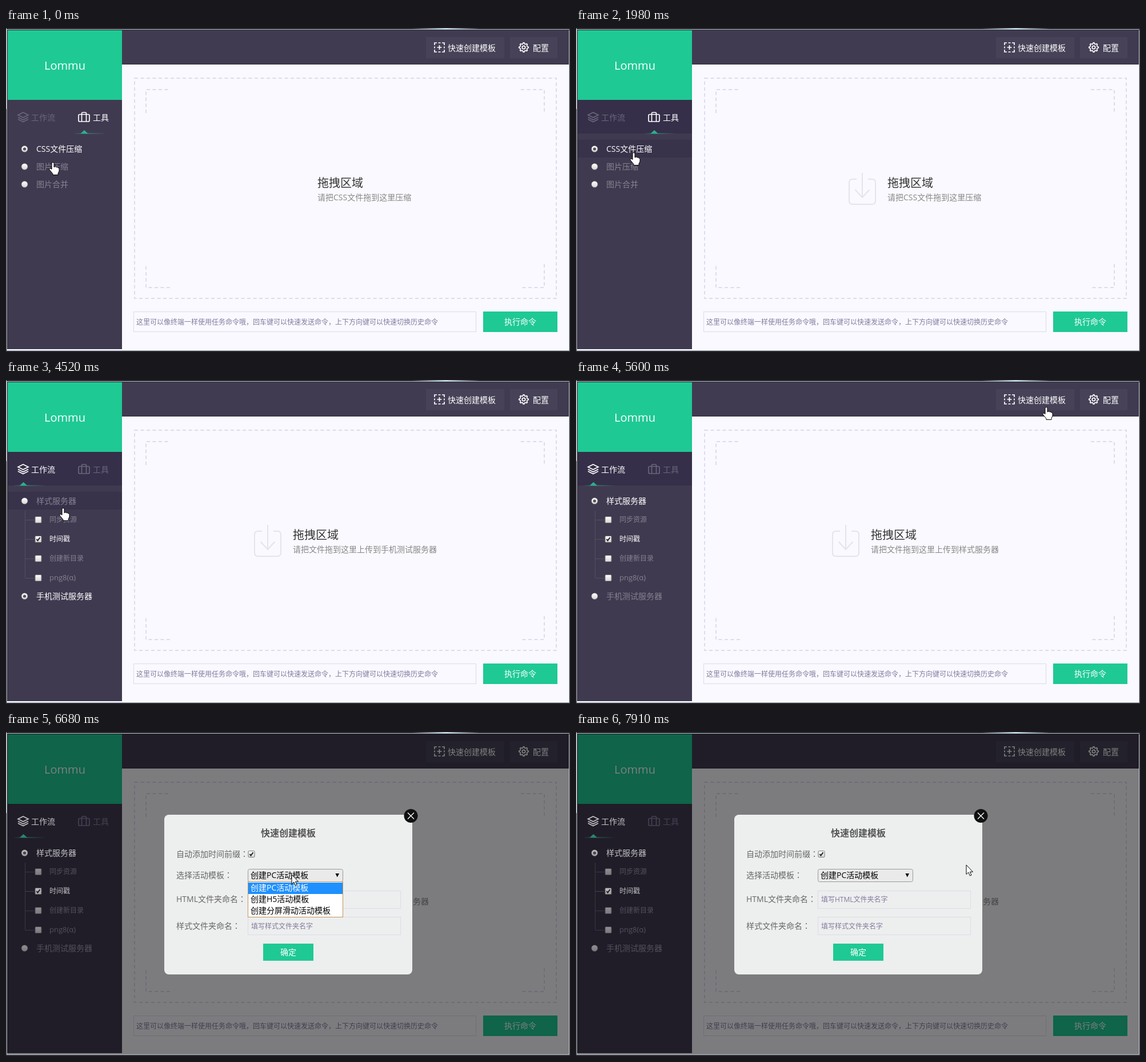
An HTML page that plays this animation: 987x568 px, repeating every 8 s.

```html
<!DOCTYPE html>
<html lang="zh-CN">
<head>
<meta charset="utf-8">
<title>任务工具</title>
<style>
html, body { margin: 0; width: 100%; height: 100%; overflow: hidden; background: #f9f9ff; }
svg { display: block; width: 987px; height: 568px; }
text { font: 14px "Open Sans", "Noto Sans CJK SC", "Noto Sans CJK", sans-serif; white-space: pre; }
.wide { font-family: "Noto Sans CJK TC", "Noto Sans CJK", sans-serif; }
.s12 { font-size: 12px; }
.white { fill: #fff; }
.green { fill: #1fc994; }
.line { fill: none; stroke: #dcdcec; }
.dash { fill: none; stroke: #dcdcee; stroke-width: 2; stroke-dasharray: 6 4.5; }
.icon { fill: none; stroke: currentColor; stroke-width: 1.7; }
.tab { color: #6b657c; }
.tab.on { color: #fff; }
.tab text { fill: currentColor; }
.tab .mark { display: none; }
.tab.on .mark { display: inline; }
.item text { fill: #868191; }
.item.on text { fill: #fff; }
.item .dot { display: none; }
.item.on .dot { display: inline; }
.dim .tab, .dim .item { opacity: .5; }
.dim .on { opacity: .72; }
.label { fill: #666; }
.hint { fill: #827b9e; }
</style>
</head>
<body>
<svg viewBox="0 0 987 568">
  <defs>
    <linearGradient id="edge">
      <stop offset="0" stop-color="#20262e"/><stop offset=".72" stop-color="#20262e"/>
      <stop offset=".78" stop-color="#b9d5e2"/><stop offset=".84" stop-color="#20262e"/>
      <stop offset="1" stop-color="#20262e"/>
    </linearGradient>
    <linearGradient id="glow">
      <stop offset="0" stop-color="#2fae8c" stop-opacity="0"/><stop offset=".35" stop-color="#2fae8c"/>
      <stop offset="1" stop-color="#2fae8c" stop-opacity="0"/>
    </linearGradient>
    <linearGradient id="knob" x2="0" y2="1">
      <stop offset="0" stop-color="#fff"/><stop offset="1" stop-color="#d6d6d6"/>
    </linearGradient>
  </defs>

  <rect width="987" height="568" fill="#2b3038"/>
  <rect width="987" height="2" fill="url(#edge)"/>
  <rect width="1" height="142" fill="#aeb4b8"/>
  <rect x="1.5" y="2.5" width="984" height="563" fill="#f9f9ff" stroke="#c9cbd0"/>
  <rect x="2" y="3" width="984" height="1" fill="#25222e"/>
  <rect x="2" y="3" width="1" height="560" fill="#25222e"/>
  <rect x="3" y="4" width="982" height="60" fill="#403b51"/>
  <rect x="203" y="63" width="782" height="1" fill="#302b40"/>
  <rect x="3" y="126" width="200" height="437" fill="#403a50"/>
  <rect class="green" x="3" y="4" width="200" height="122"/>
  <text class="white" x="103" y="73" text-anchor="middle" style="font-size:20px">Lommu</text>
  <rect id="bar" x="3" y="126" width="200" height="59" fill="#352f49"/>
  <rect id="hover" x="3" width="200" height="31" fill="#38324a"/>

  <rect x="735" y="16" width="137" height="37" fill="#474258"/>
  <rect x="882" y="16" width="83" height="37" fill="#474258"/>
  <g color="#fff">
    <path class="icon" d="M750 30v-4h4M763 26h4v4M767 38v4h-4M754 42h-4v-4M756.500 26h4M756.500 42h4M750 32.500v3M767 32.500v3M754.500 34h8M758.500 30v8"/>
    <path id="gear" class="icon"/>
    <circle class="icon" cx="906" cy="34" r="2.700"/>
  </g>
  <text class="white" x="773" y="40">快速创建模板</text>
  <text class="white" x="922" y="40">配置</text>

  <rect class="dash" x="225" y="88" width="738" height="386"/>
  <path class="dash" d="M245 149v-41h42M901 108h41v41M942 414v41h-41M287 455h-42v-41"/>
  <g id="drop">
    <path id="tray" d="M14 265H7q-6 0-6 6v32q0 6 6 6h34q6 0 6-6v-32q0-6-6-6h-7M24 254v43M11.500 283.500L24 297l12.500-13.500" fill="none" stroke="#e4e4ec" stroke-width="2"/>
    <text x="68" y="279" fill="#333" style="font-size:20px">拖拽区域</text>
    <text id="tip" x="68" y="302" fill="#888"></text>
  </g>
  <rect class="line" x="223.500" y="497.500" width="599" height="35"/>
  <text class="s12 hint" x="228" y="520">这里可以像终端一样使用任务命令哦，回车键可以快速发送命令，上下方向键可以快速切换历史命令</text>
  <rect class="green" x="835" y="497" width="130" height="36"/>
  <text class="white" x="872" y="520">执行命令</text>

  <rect id="shade" x="2" y="3" width="983" height="562" opacity=".5"/>
  <g id="side">
    <g id="flowTab" class="tab">
      <path class="icon" d="M21 152.500L30 148l9 4.500-9 4.500zM21 156.500l9 4.500 9-4.500M21 160l9 4.500 9-4.500"/>
      <text x="44" y="162">工作流</text>
      <g class="mark"><path d="M24 185l6.500-6 6.500 6z" fill="#2fae8c"/><rect x="12" y="184.500" width="58" height="1" fill="url(#glow)"/></g>
    </g>
    <g id="toolTab" class="tab">
      <path class="icon" d="M129 151.500h15q2 0 2 2v8.500q0 2-2 2h-15q-2 0-2-2v-8.500q0-2 2-2zM132.500 164v-14q0-2 2-2h4q2 0 2 2v14"/>
      <text x="152" y="162">工具</text>
      <g class="mark"><path d="M130.500 185l6.500-6 6.500 6z" fill="#2fae8c"/><rect x="118" y="184.500" width="58" height="1" fill="url(#glow)"/></g>
    </g>
    <g id="tools"></g>
    <g id="flow"></g>
  </g>

  <g id="modal">
    <rect x="277" y="145" width="434" height="280" rx="8" fill="#edeeee"/>
    <circle cx="708.500" cy="147" r="12" fill="#111"/>
    <path d="M703 141.500l11 11m0-11l-11 11" stroke="#fff" stroke-width="1.300"/>
    <text x="446" y="183" fill="#555" style="font-size:16px;font-weight:bold">快速创建模板</text>
    <text class="label" x="298" y="219">自动添加时间前缀：</text>
    <text class="label" x="298" y="256">选择活动模板：</text>
    <text class="label" x="298" y="298">HTML文件夹命名：</text>
    <text class="label" x="298" y="345">样式文件夹命名：</text>
    <g id="prefix"></g>
    <rect x="423.500" y="240.500" width="166" height="22" rx="3" fill="#eaeaea" stroke="#9a9a9a"/>
    <text x="428" y="256">创建PC活动模板</text>
    <path d="M576.500 248h6.500l-3.250 6.500z"/>
    <rect class="line" x="423.500" y="278.500" width="267" height="31"/>
    <rect class="line" x="423.500" y="324.500" width="267" height="31"/>
    <text class="s12 hint" x="429" y="298">填写HTML文件夹名字</text>
    <text class="s12 hint" x="429" y="345">填写样式文件夹名字</text>
    <rect class="green" x="450" y="371" width="88" height="30"/>
    <text class="white" x="480" y="391">确定</text>
    <g id="menu">
      <rect x="423.500" y="262.500" width="166" height="62" fill="#fff" stroke="#c0945c"/>
      <rect id="pick" x="424" width="165" height="20" fill="#1e90ff"/>
      <g id="options"></g>
    </g>
  </g>

  <g id="cursor" fill="#fff" stroke="#000">
    <path id="hand" d="M-2 1.500a2 2 0 0 1 4 0V8l1-.600a2 2 0 0 1 3 .800 2 2 0 0 1 3 .800 2 2 0 0 1 2 1.600V15l-2 4v2.500H0v-1.800L-5.500 13q-1.400-2 0-2.800 1.600-.600 3.500 1.500z"/>
    <path id="arrow" d="M0 0v16.500l3.800-3.500 2.600 6 2.600-1.200-2.500-5.600h5z"/>
  </g>
</svg>
<script>
const $ = id => document.getElementById(id);
const LOOP = 8000;
const start = performance.now();

const check = (x, y, on) =>
  `<rect x="${x - 5.5}" y="${y - 5.5}" width="11" height="11" rx="1.500" fill="url(#knob)" stroke="#777"/>` +
  (on ? `<path d="M${x - 3} ${y}l2 2.500 4-5.500" fill="none" stroke="#222" stroke-width="2"/>` : '');

const radio = ({ name, y }) => `<g class="item choice">
  <circle cx="32.500" cy="${y}" r="5.500" fill="url(#knob)" stroke="#777" stroke-width=".6"/>
  <circle class="dot" cx="32.500" cy="${y}" r="2.600" fill="#555"/>
  <text x="53" y="${y + 5}">${name}</text></g>`;

// Each mode centres its icon and caption, so x depends on the caption width.
const modes = [
  { name: 'CSS文件压缩', y: 212, x: 477, tip: '请把CSS文件拖到这里压缩' },
  { name: '图片压缩', y: 243, x: 490, tip: '请把图片拖到这里压缩' },
  { name: '图片合并', y: 274, x: 456, tip: '请把需要合并的图片文件拖到这里' },
  { name: '样式服务器', y: 212, x: 448, tip: '请把文件拖到这里上传到样式服务器' },
  { name: '手机测试服务器', y: 379, x: 434, tip: '请把文件拖到这里上传到手机测试服务器' }
];
const subs = ['同步资源', '时间戳', '创建新目录', 'png8(α)'];
const choices = ['创建PC活动模板', '创建H5活动模板', '创建分屏滑动活动模板'];

$('tools').innerHTML = modes.slice(0, 3).map(radio).join('');
$('flow').innerHTML = '<path class="item" d="M33.500 229v118" stroke="#554f64"/>' +
  modes.slice(3).map(radio).join('') +
  subs.map((name, i) => {
    const y = 245 + i * 34, on = i === 1;
    return `<g class="item ${on ? 'on' : ''}"><path d="M34 ${y + .5}h15" stroke="#554f64"/>${check(56.5, y, on)}
      <text x="76" y="${y + 4}" style="font-size:${i === 3 ? 13 : 12}px">${name}</text></g>`;
  }).join('');
$('prefix').innerHTML = check(429.5, 214, true);
$('options').innerHTML = choices.map((c, i) => `<text x="428" y="${278 + i * 20}">${c}</text>`).join('');

const cog = Array.from({ length: 32 }, (_, i) => {
  const a = (i - .5) * Math.PI / 16, r = i % 4 < 2 ? 8.2 : 6.2;
  return `${(906 + r * Math.cos(a)).toFixed(1)} ${(34 + r * Math.sin(a)).toFixed(1)}`;
});
$('gear').setAttribute('d', `M${cog.join('L')}z`);

// Full-width colons sit in the middle of their cell.
document.querySelectorAll('.label').forEach(el => {
  el.innerHTML = el.textContent.replace('：', '<tspan class="wide" lang="zh-TW">$&</tspan>');
});

// Tracks hold each value until the next key.
const modeTrack = [[0, 0], [250, 1], [770, 2], [1840, 0], [2480, 3], [3830, 4], [4630, 3]];
const pickTrack = [[0, 0], [7070, 1], [7190, 2], [7490, 1], [7630, 0]];
const path = [
  [0, 82, 236], [510, 84, 250], [640, 86, 266], [1170, 88, 262], [1300, 92, 250],
  [1430, 96, 238], [1570, 100, 226], [1700, 101, 219], [2100, 96, 190],
  [2220, 70, 164], [2340, 52, 163], [3140, 60, 230], [3290, 92, 330], [3440, 103, 377],
  [4230, 104, 340], [4360, 104, 280], [4500, 100, 225], [4630, 98, 211],
  [4910, 180, 200], [5050, 330, 160], [5190, 520, 110], [5330, 700, 80],
  [5460, 800, 55], [5600, 823, 48], [5720, 820, 47], [5990, 800, 60], [6120, 740, 110],
  [6260, 660, 180], [6390, 570, 230], [6530, 500, 250], [6800, 492, 256],
  [7070, 491, 290], [7190, 490, 310], [7490, 490, 291], [7630, 492, 272],
  [7770, 560, 255], [7910, 683, 233]
];
const at = (track, t) => track.findLast(k => k[0] <= t);
const show = (id, on) => $(id).setAttribute('display', on ? 'inline' : 'none');
const items = [...document.querySelectorAll('.choice')];

function draw(t) {
  const mode = at(modeTrack, t)[1], m = modes[mode];
  const [, x, y] = at(path, t);
  const isFlow = mode > 2, modal = t >= 5720;

  items.forEach((el, i) => el.classList.toggle('on', i === mode));
  $('flowTab').classList.toggle('on', isFlow);
  $('toolTab').classList.toggle('on', !isFlow);
  $('side').classList.toggle('dim', modal);
  show('flow', isFlow);
  show('tools', !isFlow);
  show('bar', t >= 1170 && !modal);
  show('tray', t >= 250);
  $('drop').setAttribute('transform', `translate(${m.x} 0)`);
  $('tip').textContent = m.tip;

  const list = isFlow ? modes.slice(3) : modes.slice(0, 3);
  const row = t >= 1170 && x < 203 && list.find(r => y >= r.y - 16 && y < r.y + 15);
  show('hover', !!row);
  if (row) $('hover').setAttribute('y', row.y - 16);

  show('shade', modal);
  show('modal', modal);
  show('menu', t >= 6660 && t < 7770);
  const pick = at(pickTrack, t)[1];
  $('pick').setAttribute('y', 264 + pick * 20);
  [...$('options').children].forEach((el, i) => el.setAttribute('fill', i === pick ? '#fff' : '#000'));

  const overButton = x > 735 && y < 53;
  const hand = !modal && (x < 150 || overButton);
  show('hand', hand);
  show('arrow', !hand);
  $('cursor').setAttribute('transform', `translate(${x} ${y})`);
}

function tick() {
  draw((performance.now() - start) % LOOP);
  requestAnimationFrame(tick);
}
tick();
</script>
</body>
</html>
```
